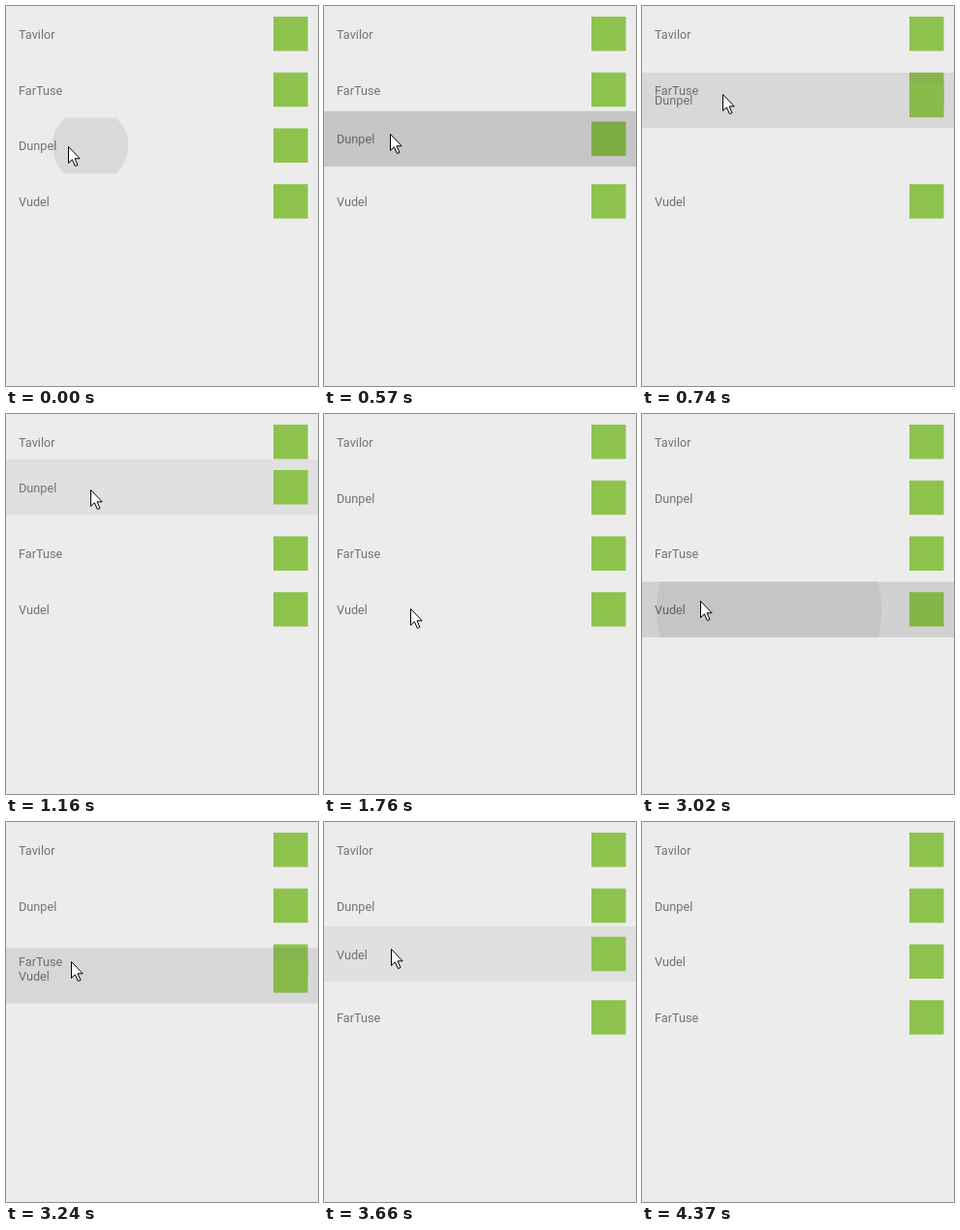
Animation of 322 by 393 pixels, one loop 4.81 s. Source, as an HTML page:

```html
<!DOCTYPE html>
<html lang="en">
<head>
<meta charset="utf-8">
<title>Drag to reorder</title>
<style>
  html, body { margin: 0; width: 100%; height: 100%; overflow: hidden; background: #ececec; }
  #stage { display: block; width: 322px; height: 393px; }
  text { font: 12.7px Roboto, Arial, sans-serif; fill: #727272; }
</style>
</head>
<body>
<svg id="stage" viewBox="0 0 322 393">
  <g id="list"></g>
  <path id="cursor" d="M.5 .5V17.5L4.4 13.8L7.4 20.6L10 19.5L7 12.8H12.2Z" fill="#fff" stroke="#000"/>
</svg>
<script>
const LOOP = 4810, WIDTH = 322, ROW = 57.75;
const LONG_PRESS = 510, PULL = 600, SWAP_DELAY = 350, SETTLE = 250;
const NS = "http://www.w3.org/2000/svg";

const ramp = (t, start, length) => Math.min(1, Math.max(0, (t - start) / length));
const mix = (a, b, f) => a + (b - a) * f;
const smooth = f => (1 - Math.cos(Math.PI * f)) / 2;
const easeIn = f => f * f;
const easeOut = power => f => 1 - (1 - f) ** power;

// The hand presses a row, pulls it up past its neighbour and drops it.
const drags = [
  { press: -175, lift: 550, drop: 1360, pull: -68.5, from: [64, 145], to: [87, 78] },
  { press: 2500, lift: 3060, drop: 3990, pull: -65.5, from: [60, 193], to: [69, 131] }
];

const pullLeg = ({ lift, to }) => ({ start: lift - 10, length: PULL, to, ease: easeOut(4) });
const cursorLegs = [
  pullLeg(drags[0]),
  { start: 1540, length: 260, to: [89, 208], ease: smooth },
  { start: 1815, length: 345, to: drags[1].from, ease: smooth },
  pullLeg(drags[1]),
  { start: 4040, length: 330, to: [382, 435], ease: easeIn }
];

function set(node, attrs) {
  for (const name in attrs) node.setAttribute(name, attrs[name]);
}

function add(parent, tag, attrs) {
  const node = document.createElementNS(NS, tag);
  set(node, attrs);
  return parent.appendChild(node);
}

function makeRow(label, index) {
  const box = add(document.getElementById("list"), "svg", { y: index * ROW, width: WIDTH, height: ROW });
  const cover = { width: WIDTH, height: ROW, opacity: 0 };
  const selected = add(box, "rect", { ...cover, fill: "#777" });
  add(box, "text", { x: 13, y: 33.8 }).textContent = label;
  add(box, "rect", { x: 276, y: 11, width: 35.5, height: 35.5, fill: "#8dc24d" });
  const haze = add(box, "rect", cover);
  const ripple = add(box, "circle", { cy: ROW / 2, opacity: 0 });
  return { box, selected, haze, ripple, home: index * ROW };
}

const [, passed, ...dragged] = ["Tavilor", "FarTuse", "Dunpel", "Vudel"].map(makeRow);
const cursor = document.getElementById("cursor");

function drawDragged(row, { press, lift, drop, pull, from }, t) {
  const shift = pull * easeOut(3)(ramp(t, lift, PULL));
  const y = row.home + mix(shift, -ROW, smooth(ramp(t, drop, SETTLE)));
  const isSelected = t >= press + LONG_PRESS && t < drop + SETTLE;
  const pressed = ramp(t, press + 170, 360);
  const grow = ramp(t, press, 740);

  set(row.box, { y });
  set(row.selected, { opacity: isSelected ? .105 : 0 });
  set(row.haze, { opacity: .07 * pressed * (1 - ramp(t, lift, 400)) });
  set(row.ripple, {
    cx: mix(from[0], WIDTH / 2, grow),
    r: 165 * grow,
    opacity: mix(.08, .058, pressed) * (1 - ramp(t, lift, 170))
  });
}

function cursorAt(t) {
  return cursorLegs.reduce((at, { start, length, to, ease }) => {
    const f = ease(ramp(t, start, length));
    return at.map((v, i) => mix(v, to[i], f));
  }, drags[0].from);
}

function draw(t) {
  const swaps = drags.map(({ lift }) => smooth(ramp(t, lift + SWAP_DELAY, SETTLE)));
  set(passed.box, { y: passed.home + ROW * (swaps[0] + swaps[1]) });
  dragged.forEach((row, i) => drawDragged(row, drags[i], t));
  set(cursor, { transform: `translate(${cursorAt(t).map(Math.round).join(" ")})` });
}

const begin = performance.now();
function loop() {
  draw((performance.now() - begin) % LOOP);
  requestAnimationFrame(loop);
}
loop();
</script>
</body>
</html>
```
